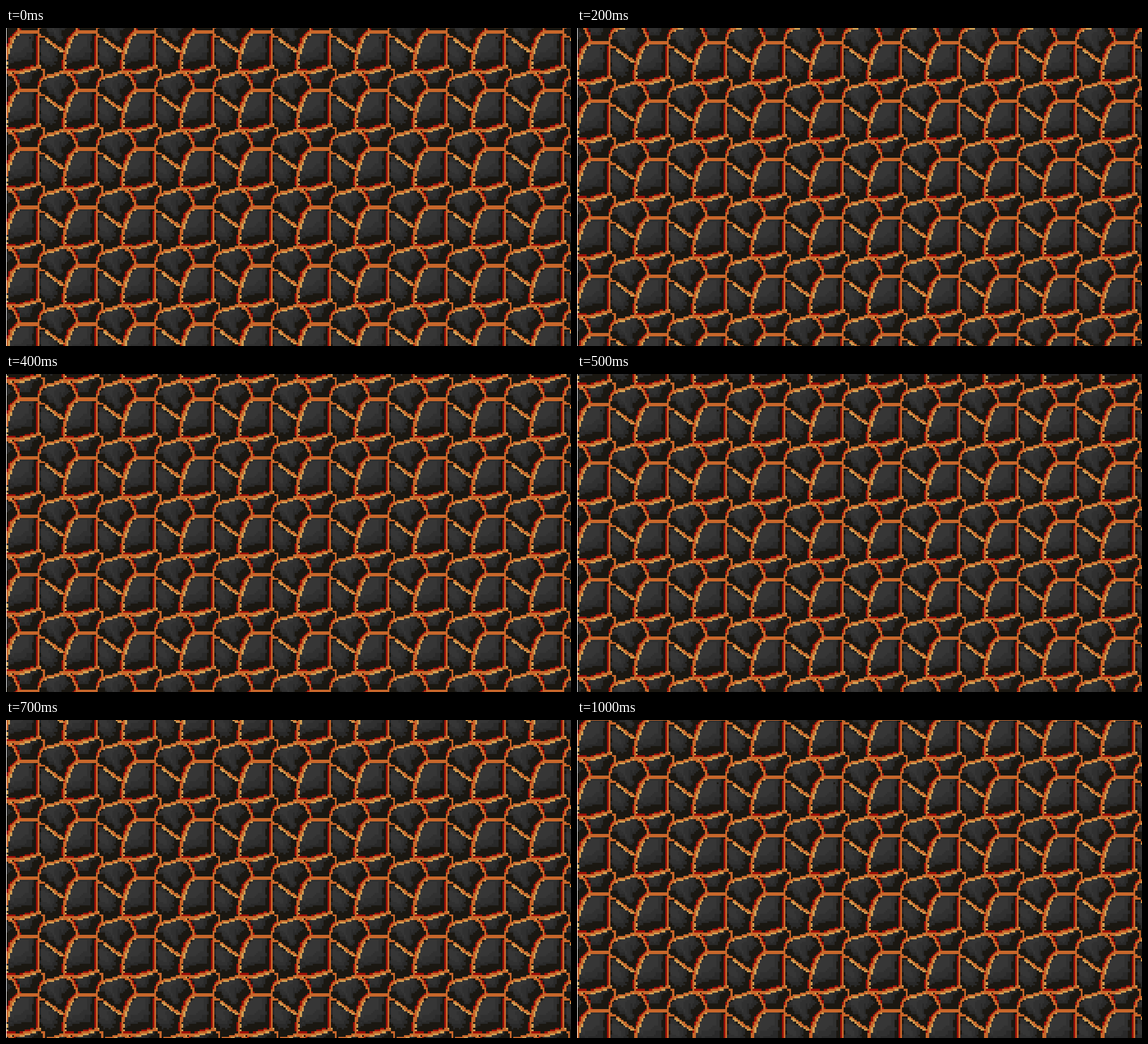
An HTML page with a canvas for the animation above (1.1 s loop, 998 px wide and 561 px high).

```html
<!DOCTYPE html>
<html lang="en">
<head>
<meta charset="utf-8">
<title>Lava rock scroll</title>
<style>
  html, body { margin: 0; width: 100%; height: 100%; overflow: hidden; background: #fff; }
  canvas { display: block; }
</style>
</head>
<body>
<canvas id="stage" width="998" height="561"></canvas>
<script>
const SIZE = 32, PITCH = 3.22, PERIOD = SIZE * PITCH;
const STEPS = 11, STEP_MS = 100;
const ORANGE = '#c8672b', TAN = '#d0a055', RED = '#9c0f08', DARK = '#1a1711';

const point = (x, y) => ({ x, y });
const below = p => point(p.x, p.y + SIZE);
const beside = p => point(p.x + SIZE, p.y);

// Corners where cracks meet, in cells of one repeat
const topLeft = point(6.8, 1), topRight = point(17.4, 1);
const tip = point(0.2, 11.8), footLeft = point(-1, 22.6), footRight = point(17.4, 19.8);
const lobe = point(20.8, 25.4), stub = point(20.5, 3.8);

// Each crack: its corners in order, then the rim colour on the left and right hand
const cracks = [
  [[topLeft, point(2.8, 5), tip, point(-0.2, 17), footLeft], TAN, RED],
  [[topLeft, topRight]],
  [[topRight, footRight], null, RED],
  [[footLeft, point(6.5, 23), footRight], RED, TAN],
  [[footRight, point(20.5, 22), lobe]],
  [[lobe, point(18.5, 28.5), below(topRight)], null, RED],
  [[lobe, point(25, 24.3), beside(footLeft)], null, TAN],
  [[footLeft, point(4, 25.5), point(5.7, 28.5), below(topLeft)], RED, null],
  [[topRight, point(18.5, 3.8), stub]],
  [[point(22, 4.2), point(26, 7.8), beside(tip)], null, TAN]
];

const segments = cracks.flatMap(([path, left, right]) =>
  path.slice(1).map((to, i) => ({ from: path[i], to, left, right })));

const wrap = d => d - SIZE * Math.round(d / SIZE);

function noise(x, y) {
  const n = Math.sin(x * 12.9898 + y * 78.233) * 43758.5453;
  return n - Math.floor(n);
}

// Vector from the nearest place on a segment to the cell, and the side it lies on
function measure(x, y, { from, to }) {
  const dx = to.x - from.x, dy = to.y - from.y;
  const px = wrap(x - from.x - dx / 2) + dx / 2;
  const py = wrap(y - from.y - dy / 2) + dy / 2;
  const t = Math.min(1, Math.max(0, (px * dx + py * dy) / (dx * dx + dy * dy)));
  const ox = px - t * dx, oy = py - t * dy;
  return { ox, oy, dist: Math.hypot(ox, oy), side: dx * py - dy * px };
}

function cellColor(col, row) {
  let core = Infinity, rimDist = 1.4, rim = null, depth = Infinity;
  for (const segment of segments) {
    const { ox, oy, dist, side } = measure(col + 0.5, row + 0.5, segment);
    const color = side > 0 ? segment.right : segment.left;
    core = Math.min(core, dist);
    if (color && dist < rimDist) {
      rimDist = dist;
      rim = color;
    }
    // Rocks are lit from the upper left, so shade reaches further in from below
    depth = Math.min(depth, 1.2 * dist + 0.54 * ox + 0.72 * oy);
  }
  if (core < 0.62) return ORANGE;
  if (rim && noise(col, row) < 0.85) return rim;
  depth += (noise(col >> 1, row >> 1) - 0.5) * 0.6;
  return depth < 1.9 ? DARK : depth < 2.6 ? '#292929' : depth < 3.6 ? '#303030' : '#363636';
}

const tile = document.createElement('canvas');
tile.width = tile.height = SIZE;
const art = tile.getContext('2d');
for (let row = 0; row < SIZE; row++) {
  for (let col = 0; col < SIZE; col++) {
    art.fillStyle = cellColor(col, row);
    art.fillRect(col, row, 1, 1);
  }
}

const stage = document.getElementById('stage').getContext('2d');
const pattern = stage.createPattern(tile, 'repeat');
stage.imageSmoothingEnabled = false;

function draw(time) {
  const step = Math.floor(time / STEP_MS) % STEPS;
  const shift = step * PERIOD / STEPS;

  stage.setTransform(PITCH, 0, 0, PITCH, 1, 4 + shift);
  stage.fillStyle = pattern;
  stage.fillRect(0, -SIZE * 2, SIZE * 12, SIZE * 9);

  stage.setTransform(1, 0, 0, 1, 0, 0);
  stage.fillStyle = DARK;
  for (let x = 41; x < 998; x += PERIOD * 2) {
    stage.fillRect(Math.round(x), Math.round(16 + shift), 3, 3);
  }
}

function tick(now) {
  draw(now);
  requestAnimationFrame(tick);
}
draw(0);
requestAnimationFrame(tick);
</script>
</body>
</html>
```
